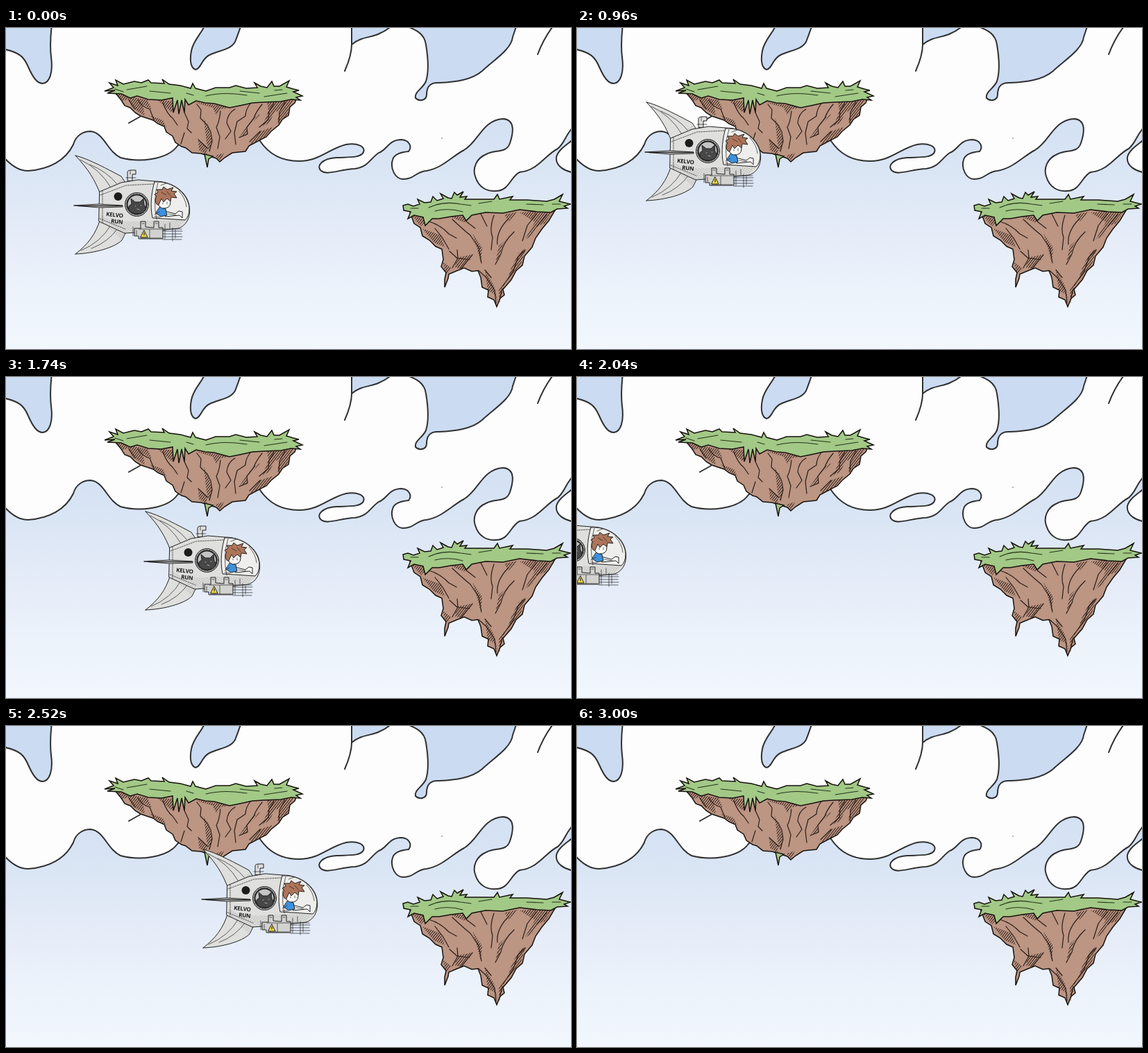
An HTML page that plays this animation: 814x463 px, repeating every 3.84 s.

```html
<!DOCTYPE html>
<html lang="en">
<head>
<meta charset="utf-8">
<title>Flying ship</title>
<style>
  html, body { margin: 0; width: 100%; height: 100%; overflow: hidden; background: #eaf1fa; }
  svg { display: block; width: 100vw; height: 100vh; }
  .line { fill: none; stroke: #303030; stroke-width: 2; stroke-linecap: round; stroke-linejoin: round; }
  .cloud { fill: #fdfdfd; }
  .hole { fill: #cadbf2; }
  .rock { fill: #bc9583; }
  .grass { fill: #a2c986; }
  .rock, .grass { stroke: #17120e; stroke-width: 1.5; stroke-linejoin: miter; }
  .crack { fill: none; stroke: #2a1d17; stroke-width: 1.2; stroke-linecap: round; stroke-linejoin: round; }
  .shade { fill: url(#hatch); }
  .blade { fill: none; stroke: #26331c; stroke-width: 1.1; stroke-linecap: round; }
  #ship { stroke: #222; stroke-width: 1; stroke-linejoin: round; stroke-linecap: round; }
  .hull { fill: #dfdfde; }
  .thin { fill: none; stroke-width: .7; }
  .none { stroke: none; }
  .name { font: 700 8px "Open Sans", sans-serif; fill: #181818; stroke: none; letter-spacing: -.2px; }
</style>
</head>
<body>
<svg viewBox="0 0 814 463" preserveAspectRatio="none">
  <defs>
    <linearGradient id="sky" x2="0" y2="1">
      <stop offset="0" stop-color="#c9dbf3"/>
      <stop offset=".4" stop-color="#d8e4f4"/>
      <stop offset=".58" stop-color="#e2eaf7"/>
      <stop offset=".8" stop-color="#ecf2fb"/>
      <stop offset="1" stop-color="#f2f7fd"/>
    </linearGradient>
    <pattern id="hatch" width="2.8" height="2.8" patternUnits="userSpaceOnUse" patternTransform="rotate(38)">
      <path d="M0 0V2.8" stroke="#2a1a13" stroke-width="1.9"/>
    </pattern>
    <pattern id="dots" width="3" height="3" patternUnits="userSpaceOnUse" patternTransform="rotate(30)">
      <circle cx="1" cy="1" r=".5" fill="#555"/>
    </pattern>
  </defs>

  <rect width="814" height="463" fill="url(#sky)"/>

  <!-- clouds -->
  <path class="cloud line" d="M-5 -5V184C8 200 20 206 32 206C62 204 86 191 97 168C101 154 112 149 122 149
    C141 151 146 178 165 187C190 194 232 191 247 170L300 120L366 163C380 184 400 192 422 192
    C452 192 465 174 490 168C506 165 518 171 515 179C511 188 492 186 476 187C456 188 446 199 454 206
    C463 213 480 204 503 203C522 200 524 189 537 180C549 176 551 161 570 161C582 162 585 172 580 178
    C570 179 559 182 557 190C553 203 561 218 572 218C589 218 590 207 606 206C629 202 644 184 660 176
    C681 164 686 133 716 131C734 132 731 151 726 166C721 181 706 175 692 182C677 188 672 203 676 214
    C681 231 694 236 706 235C725 235 727 214 740 208C766 206 778 182 795 174C807 163 803 158 820 139V-5Z"/>
  <path class="cloud line" d="M820 158C812 166 796 174 793 186C791 199 805 207 820 209"/>
  <path class="hole line" d="M-5 30C20 35 26 42 32 56C39 72 45 80 53 80C63 79 68 64 65 42C63 25 64 12 66 -5H-5Z"/>
  <path class="hole line" d="M287 -5C282 8 270 17 267 33C264 49 267 58 273 60C281 59 282 44 293 39C307 32 323 32 330 20Q334 10 339 -5Z"/>
  <path class="hole line" d="M498 -5V24C512 12 527 14 538 8Q548 4 558 -5Z"/>
  <path class="line" d="M498 20Q499 37 488 62M790 -5Q775 14 766 38M177 137L193 128"/>
  <path class="hole line" d="M570 -5C591 2 603 8 605 24C608 42 610 61 605 77C600 88 588 92 590 101C596 107 606 104 606 96
    C606 84 612 78 624 79C647 78 671 75 686 62C703 46 728 31 730 13L736 -5Z"/>
  <circle cx="628" cy="159" r=".8" fill="#555"/>

  <!-- left island -->
  <path class="rock" d="M157 93L166 104 171 112 179 115 186 122 194 127 203 130 212 133 219 138 228 142 231 150 240 156
    244 165 253 171 259 173 268 180 281 181 290 184 303 188 308 193 315 187 326 180 345 178 350 170 365 162 375 157
    382 149 393 140 398 132 407 126 409 114 416 108 420 98 320 90Z"/>
  <path class="shade" d="M160 95L204 104 210 118 197 110 200 127 182 115 176 103 168 105ZM217 103L245 106 239 122ZM272 107L326 114
    310 117 303 126 298 115ZM376 107L416 104 408 114 406 126 390 137 396 117 386 122 380 136 370 142 378 119ZM355 130L367 124 346 145 348 154 336 158ZM285 130L292 146 297 160 293 178 289 166ZM277 162L290 172 289 183 278 176Z
    M366 149L384 143 378 154 350 169ZM302 184L314 180 309 192ZM207 126L226 133 231 143 214 133Z"/>
  <path class="crack" d="M177 104L186 117M190 104Q196 114 207 117L213 132M226 108Q232 124 240 130L247 140M257 122L263 135 261 145
    267 151M275 110L281 118 280 130 290 140 295 150 297 163 293 178M309 120Q307 137 303 143L308 157 305 174M330 117
    Q319 123 318 137L324 149 316 160M352 109Q345 118 345 127L333 135 329 151 331 168M369 110Q360 121 357 130L347 143 348 153
    336 158M386 109L379 120 378 132 365 143M402 107L394 121 393 137M366 149L351 164M257 151L252 167M277 161L291 174"/>
  <path class="grass" d="M142 91L155 86 149 79 161 83 158 75 169 81 185 77 195 79 205 75 209 79 228 80 225 74 235 81 251 83
    266 87 269 80 273 87 288 91 302 86 322 86 331 83 346 87 362 86 358 79 367 84 376 86 383 77 386 84 394 84 408 76
    404 85 414 88 422 90 414 92 427 98 418 100 424 104 411 103 396 106 371 107 355 108 337 112 322 115 300 109 287 108
    274 105 263 111 258 103 257 122 253 104 249 124 247 104 241 122 240 101 224 104 205 103 189 98 179 101 166 95 146 94 157 90Z"/>
  <path class="blade" d="M174 89L203 84M207 91L237 94M288 98Q307 93 330 95L347 97M337 91L365 94M372 99L405 94M260 94L270 97M157 88L169 92M387 90L398 89"/>
  <path class="grass" d="M286 182L290 201 292 189 298 185Z"/>

  <!-- right island -->
  <path class="rock" d="M582 266L588 282 597 288 600 300 610 306 619 315 628 319 630 334 627 344 634 353 632 362 632 374
    637 361 638 355 650 350 660 346 671 351 680 350 684 360 686 374 695 378 694 388 703 392 707 402 712 390 718 385
    716 377 728 363 735 350 744 342 747 329 758 316 763 303 772 290 782 278 791 263 690 255Z"/>
  <path class="shade" d="M584 270L607 276 598 286ZM600 289L626 299 632 316 616 309ZM640 272L670 272 661 281ZM651 331L671 327
    656 348 646 345ZM672 296L686 317 684 338 679 320ZM740 266L789 263 776 282 766 285 758 299 747 306 762 280ZM727 297L716 312 710 331 705 340 710 315ZM739 324
    L749 318 741 343 720 370 728 346ZM690 349L703 372 709 398 704 384 694 379ZM710 376L719 366 711 397ZM629 337L642 347 634 357ZM718 269L738 265 724 279Z"/>
  <path class="crack" d="M609 279Q626 284 638 297L649 303M618 289L629 303 638 319M643 276Q660 292 669 299L681 317 685 339
    M663 279L676 289M703 270Q696 290 701 302L699 320M724 275Q706 293 708 312M732 294Q716 309 713 326L705 341
    M764 268L751 285 744 307M779 269L765 286M650 320L651 332 643 346M672 327L655 348M681 350L692 360 704 378 706 397
    M715 376L711 392M748 320L738 330 731 350 716 372M684 268L693 286M639 322L650 332 668 334M690 349L699 360"/>
  <path class="grass" d="M572 256L579 254 587 257 596 254 593 247 603 252 612 251 615 243 621 249 630 246 626 239 637 245
    642 246 646 237 650 241 659 236 654 244 664 243 661 247 689 247 703 247 708 240 711 247 730 243 726 248 751 248
    779 250 790 247 802 240 797 250 813 254 804 257 809 260 794 261 785 266 765 265 740 262 716 267 691 266 671 270
    663 278 658 270 641 272 624 275 614 275 604 285 601 273 588 270 579 275 583 265 573 263Z"/>
  <path class="blade" d="M609 259Q631 249 655 254L670 256M618 264Q637 259 658 265M681 253L700 250M750 254L774 255M583 260L594 260M787 254L799 254"/>

  <g id="ship">
    <path class="hull" d="M100 184C118 188 149 205 166 214L172 223 136 240C128 219 119 204 100 184Z"/>
    <path class="hull" d="M100 326C127 325 156 317 167 306L173 294 136 275C129 298 118 312 100 326Z"/>
    <path class="thin" d="M107 190Q135 203 151 230M121 197Q145 207 159 224M108 321Q137 309 151 284M123 318Q147 309 161 289"/>
    <path class="none" fill="url(#dots)" d="M139 238L166 218 172 223ZM137 276L173 294 165 305Z"/>
    <path class="hull" d="M175 220V210Q174 205 180 205H187V211H182V220Z"/>
    <path class="thin" d="M173 216H187M179 206V211"/>
    <path class="hull" d="M135 236L166 223 190 219 214 221C239 221 258 235 263 252C268 270 261 285 248 289L213 293 171 296 134 279Z"/>
    <path class="none" fill="url(#dots)" d="M136 269C160 286 195 276 220 278L258 277 248 288 172 295 136 279Z"/>
    <path class="thin" d="M139 235V281M136 241L173 227 213 225M135 275L172 290" stroke-dasharray="2 1.5"/>
    <!-- cockpit -->
    <path fill="#eeeeec" d="M214 222C242 220 263 241 264 260Q264 272 258 277L211 274C207 255 210 235 214 222Z"/>
    <path class="thin" d="M219 223Q211 248 217 276M223 227L231 224M249 235Q259 246 260 258"/>
    <path class="hull" d="M98 256L134 254 168 256 168 258 134 259Z"/>
    <path d="M104 256.500H167" stroke-width="1.6"/>
    <circle class="none" cx="161.500" cy="243" r="6" fill="#1c1c1c"/>
    <text class="name" transform="translate(144 271) rotate(6)">KELVO</text>
    <text class="name" transform="translate(151 281) rotate(6)">RUN</text>
    <!-- porthole -->
    <circle cx="188.500" cy="254.500" r="17" fill="#aaa"/>
    <circle cx="188.500" cy="254.500" r="14" fill="#c4c4c4" stroke-width="2"/>
    <path fill="#474747" d="M178 264Q174 257 181 254L180 246 186 251 193 251 198 246 199 255Q205 263 195 267Q185 270 178 264Z"/>
    <path class="thin" stroke="#ddd" d="M186 257H187M194 256H195M189 261L192 262"/>
    <circle class="thin" cx="188.500" cy="254.500" r="15.500" stroke-dasharray=".5 4" stroke-width="2"/>
    <!-- pilot -->
    <path fill="#fbfbfa" d="M228 264L244 268 249 264 254 265 254 274 250 270 230 272Z"/>
    <path fill="#3d91dc" d="M222 258L230 261 232 270 223 272 216 267Z"/>
    <path fill="#fbfbfa" d="M219 246Q216 256 225 260Q237 261 237 251L234 243Z"/>
    <path fill="#ae755a" d="M217 254Q213 248 217 243L214 240 219 237 217 233 225 233 227 229 232 233 241 230 238 235 246 236
      242 239 246 245 238 244 237 250 232 246 227 251 224 246 220 255Z"/>
    <path class="thin" d="M232 251V254M226 252V254M214 269L221 265M214 272L222 273M233 268L245 270M224 237L231 241M232 236L237 242"/>
    <!-- machinery -->
    <path fill="#d2d2d0" d="M194 287V279H201V287L213 288V279H220V288H226V304H191V300H185V289H194Z"/>
    <path class="thin" d="M196 282H199M215 282H218M192 290H225M183 287V300M188 292V299M207 291V303M194 303H224M229 283V289M236 281V289" stroke-width="1.200"/>
    <path class="thin" d="M226 290H253M226 293H254M226 297H253M226 301H254M226 305H253M240 288V307M229 290V304M244 291V303" stroke-width="1.200"/>
    <path fill="#f2df45" d="M199 292L204 302H194Z"/>
    <path d="M199 295.500V299" stroke-width="1.200"/>
  </g>
</svg>
<script>
  const LOOP = 3840, STEP = 60;
  // time, x, y
  const route = [
    [0, 0, 0], [600, 0, 0], [960, 0, -77], [1140, 0, 12], [1380, 78, 116],
    [1620, 205, 73], [1740, 101, 10], [2040, -194, -5], [2100, -250, -6],
    [2160, -236, -6], [3000, 744, -6], [LOOP, 744, -6]
  ];
  const ship = document.getElementById("ship");
  const start = performance.now();

  function place(time) {
    const i = route.findIndex(p => p[0] > time);
    const [t0, x0, y0] = route[i - 1], [t1, x1, y1] = route[i];
    const k = (time - t0) / (t1 - t0);
    const x = Math.round(x0 + (x1 - x0) * k), y = Math.round(y0 + (y1 - y0) * k);
    ship.setAttribute("transform", `translate(${x} ${y})`);
  }

  function draw() {
    const time = Math.max(0, performance.now() - start) % LOOP;
    place(Math.floor(time / STEP) * STEP);
    requestAnimationFrame(draw);
  }
  draw();
</script>
</body>
</html>
```
